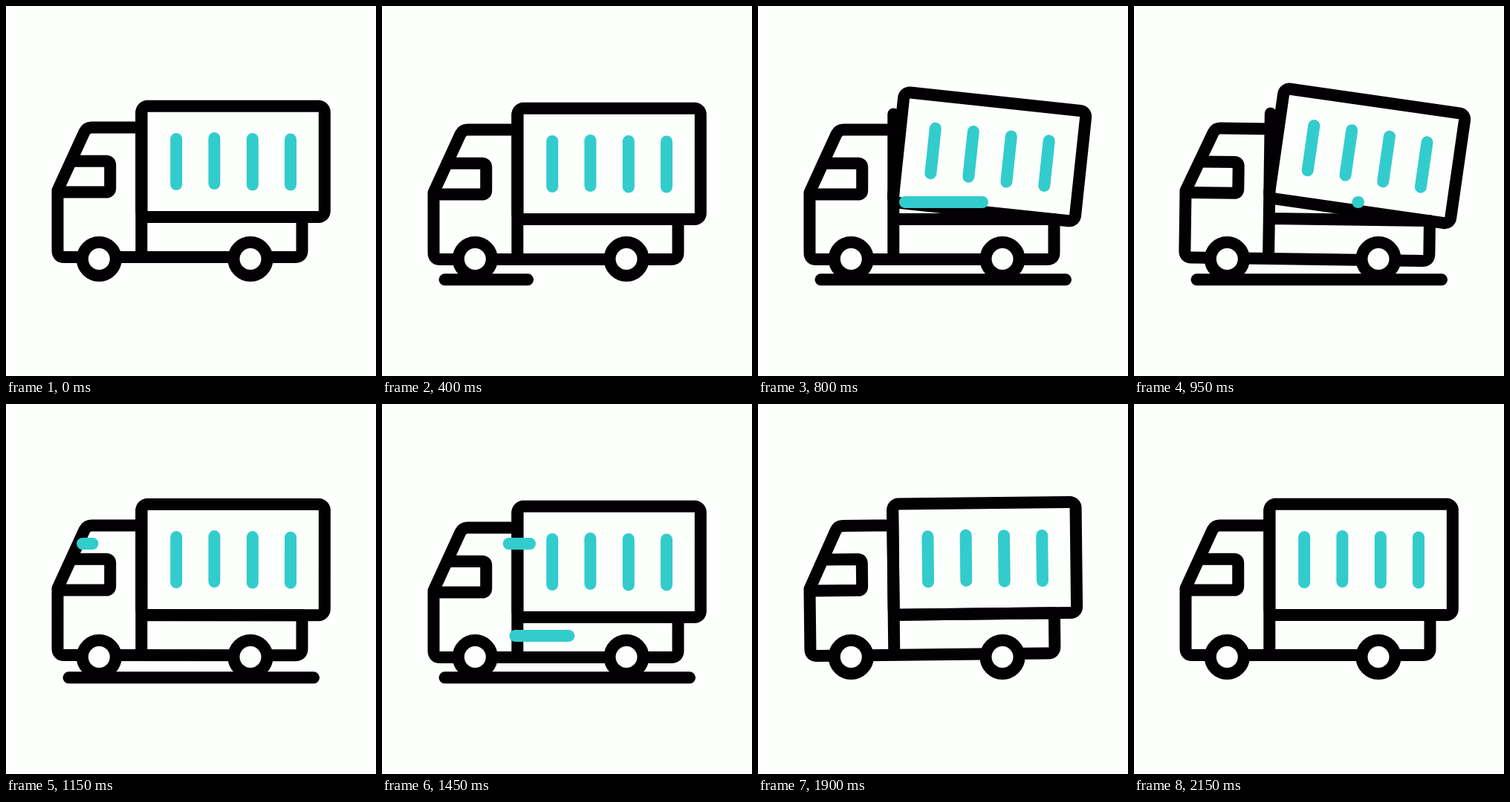
Write an HTML page that moves like this. It is 498x498 px and loops after 2.2 s.

```html
<!DOCTYPE html>
<html lang="en">
<head>
<meta charset="utf-8">
<title>Delivery truck</title>
<style>
  html, body { margin: 0; width: 100%; height: 100%; overflow: hidden; background: #fdfffd; }
  svg { display: block; width: 100vw; height: 100vh; fill: none; stroke: #020003; stroke-width: 16; stroke-linecap: round; stroke-linejoin: round; }
  .teal { stroke: #33cccc; }
  .wheel { fill: #fdfffd; }
</style>
</head>
<body>
<svg viewBox="0 0 498 498">
  <g id="body">
    <path d="M182.3 163.4H115Q108.5 163.4 105.5 169.5L69.5 248V329Q69.5 338 78.5 338H389Q398.5 338 398.5 329V284H182.3M182.3 142.5V338"/>
    <path d="M88 208.7H134.5Q140.2 208.7 140.2 214.5V245Q140.2 250.5 134.5 250.5H70"/>
    <g id="box">
      <rect x="182.4" y="134.8" width="246.4" height="149.2" rx="8"/>
      <path class="teal" d="M229.2 179V240M280.4 178V239M331.8 179V240.5M383 179.5V240.5"/>
    </g>
  </g>
  <path id="ground"/>
  <circle class="wheel" cx="125.3" cy="340.5" r="22.5"/>
  <circle class="wheel" cx="329" cy="340.5" r="22.5"/>
  <g class="teal">
    <path id="gustMid"/>
    <path id="gustHigh"/>
    <path id="gustLow"/>
  </g>
</svg>
<script>
const LOOP = 2200, STEP = 50, SWEEP = 320;
const get = id => document.getElementById(id);

// Eased progress of t from a to b.
function ease(t, a, b) {
  const u = Math.min(1, Math.max(0, (t - a) / (b - a)));
  return u * u * (3 - 2 * u);
}

// Rises from a to b, holds until c, falls back by d.
const pulse = (t, a, b, c, d) => ease(t, a, b) - ease(t, c, d);

// A line whose tip runs out at start and whose tail follows after lag.
function sweep(id, t, y, from, to, start, lag) {
  const at = begin => from + (to - from) * ease(t, begin, begin + SWEEP);
  const tail = at(start + lag), tip = at(start);
  get(id).setAttribute("d", tip - tail > 0.1 ? `M${tail} ${y}H${tip}` : "");
}

function frame(now) {
  const t = Math.floor(now % LOOP / STEP) * STEP;

  const sink = pulse(t, 50, 400, 950, 1175) + pulse(t, 1175, 1450, 1500, 1700);
  const jolt = pulse(t, 850, 1000, 1000, 1160);
  const nod = pulse(t, 1600, 1790, 1790, 2000);
  const lift = pulse(t, 600, 900, 900, 1150);
  get("body").setAttribute("transform", `translate(0 ${3 * sink - 2 * nod}) rotate(${1.1 * jolt - 1.4 * nod} 249 249)`);
  get("box").setAttribute("transform", `rotate(${8.2 * lift} 398 261)`);

  sweep("ground", t, 368.3, 84.5, 414, 275, 1300);
  sweep("gustMid", t, 264, 94, 302, 470, 170);
  sweep("gustHigh", t, 188, 103, 199, 1075, 170);
  sweep("gustLow", t, 312, 134, 252, 1145, 170);
  requestAnimationFrame(frame);
}
frame(0);
</script>
</body>
</html>
```
